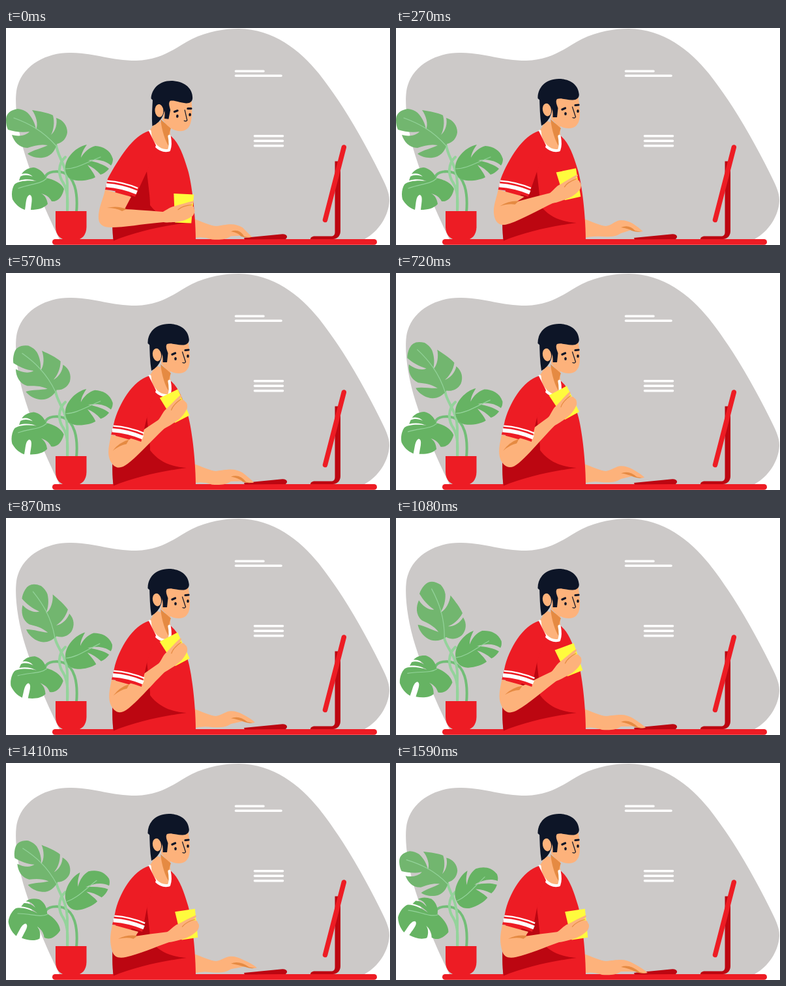
Write an HTML page that moves like this. It is 589 px wide and 333 px high and loops after 1.74 s.

```html
<!DOCTYPE html>
<html lang="en">
<head>
<meta charset="utf-8">
<title>Desk break</title>
<style>
html, body { margin: 0; width: 100%; height: 100%; overflow: hidden; background: #fff; }
svg { display: block; width: 100%; height: 100%; }
.red { fill: #ed1c24; }
.dark { fill: #bc0611; }
.skin { fill: #fdb27b; }
.shade { fill: #e58a42; }
.navy { fill: #0d1527; }
.leaf { fill: #66b363; }
.pale { fill: #72b66f; }
.line { fill: none; stroke-linecap: round; stroke-linejoin: round; }
.white { stroke: #fff; }
.stem { stroke: #94d39b; stroke-width: 4; }
.arch { stroke: #72be77; stroke-width: 4; }
.vein { stroke: #94d39b; stroke-width: 1.2; }
.ink { stroke: #0d1527; }
.band { fill: none; stroke: #fff; }
</style>
</head>
<body>
<svg viewBox="0 0 589 333">
  <path fill="#ccc9c8" d="M82 324C60 280 43 238 30 197C15 150 12 105 18 88C28 55 65 37 100 38C140 39 160 50 200 50C240 49 260 30 285 17C310 5 335 1 357 1C410 2 450 33 480 70C514 113 546 168 573 222C583 242 588 252 588 265C587 288 572 312 550 324Z"/>
  <path class="line white" stroke-width="3.6" d="M352.5 66.3H395M352.5 73.3H422M381.5 165.8H424.5M381.5 173.2H424.5M381.5 180.7H424.5"/>

  <path class="dark" d="M504.5 204.5H513V312C513 319 508 324 501 324H467C467 321 470 319.5 474 319.5H499C503 319.5 504.5 317 504.5 313Z"/>
  <path class="line" stroke="#ed1c24" stroke-width="7.5" d="M518.3 183L489.5 294.5"/>

  <path class="line arch" d="M60 229C63 219 80 219 88 222C104 228 111 250 108 283"/>
  <path class="line stem" id="stem"/>
  <path class="line stem" d="M91 198C80 208 79 225 88 238C95 250 95 265 94 283"/>
  <g id="leafC">
    <path class="leaf" d="M89 247C85 238 73 232 61 230C58 221 50 215 42 214C33 215 27 219 24 224C31 222 37 224 41 228C34 225 27 225 22 228L20 234C30 231 40 232 47 235C34 233 18 235 13 240C9 246 8 256 10 263C14 270 20 276 29 279C31 269 30 259 36 256C42 257 39 268 38 279C48 279 58 277 64 270C63 263 60 257 54 254C62 256 67 260 70 266C79 267 86 260 89 247Z"/>
    <path class="line vein" d="M62 231C53 240 37 239 19 246"/>
  </g>
  <g id="leafB">
    <path class="leaf" d="M91 213C92 198 108 182 124 179C120 185 116 191 115 199C120 190 128 183 137 181C149 182 160 187 164 201Q164 207 161 211C152 203 140 201 126 203C140 206 151 210 158 216Q152 223 145 225C139 218 132 213 125 210C130 217 135 223 137 229C130 233 118 235 108 234C97 233 90 225 91 213Z"/>
    <path class="line vein" d="M92 216C108 216 122 207 145 198"/>
  </g>
  <g id="leafA">
    <path class="pale" d="M3 156C1 152 0 147 0 141Q0 127 18 124Q27 125 33 130C40 137 45 147 46 156C50 148 46 134 40 126C52 128 64 130 72 134C75 145 73 157 69 164C76 158 79 147 77 138C88 141 94 150 94 160C93 169 87 176 78 178C75 190 67 198 56 199C47 200 38 197 33 193C42 187 54 185 64 180C52 178 43 181 33 184C20 184 12 174 9 164C20 167 31 165 36 159C24 161 13 159 3 156Z"/>
    <path class="line vein" d="M12 138C34 146 56 157 77 181"/>
  </g>
  <path class="red" d="M76 281H123.5V305C123.5 318 116 325 107 325H93C84 325 76 318 76 305Z"/>

  <rect class="red" x="71" y="324" width="498" height="8.8" rx="4.4"/>
  <path class="dark" d="M365 322L424 316.2C432 316 433 322 428 324L366 324.6Z"/>

  <path class="skin" id="typing"/>
  <path class="shade" id="knuckle"/>
  <path class="red" d="M222 158L195 185C180 215 164 245 163 285L164.5 326.5Q200 324.5 230 325H291C291 290 285 235 278 215C272 195 265 175 252 165Z"/>
  <path class="dark" d="M216 220C218 240 221 258 221 272C236 292 258 298 277 299C245 303 200 312 165 326.5C163 315 163 305 163.5 285L190 258Z"/>

  <path class="skin" d="M219 158C223 155 226 150 227 142L252 148C251 164 255 178 250 186C237 192 222 178 219 158Z"/>
  <path class="shade" d="M237 140C239 157 244 173 250 182C249 170 250 160 253 154Z"/>
  <path class="line white" stroke-width="4.3" d="M220.5 158.500C221 177 236 191 250 187.500C252.500 181 252 173 250.500 166"/>
  <g id="head">
    <path class="navy" d="M223 150C220.500 135 220.500 120 220 105H246L238 132Q234 144 223 150Z"/>
    <path class="skin" d="M242 104H279C282 118 283 132 281 141C279 150 273 154 265 154C255 154 246 149 238 139Z"/>
    <ellipse class="skin" cx="231.5" cy="125.5" rx="6.5" ry="10" transform="rotate(-10 231.5 125.5)"/>
    <path class="navy" d="M222 112L217.500 108C217 93 228 78 250 78C268 78 280 88 280.800 102C281 108 276 111 270 110.500C260 110 253 107 247 109C244 113 247 118 248.500 123L247 137H240.500C241 128 240 121 235 117C230 114 226 116 224 121Z"/>
    <path class="line ink" stroke-width="3.2" d="M255 125L259.500 123M275 118.500L280 118"/>
    <path class="line ink" stroke-width="1.2" d="M270.500 121L275.500 136.500Q274 139 271 137.500"/>
    <ellipse class="navy" cx="260" cy="131.500" rx="1.800" ry="2.500"/>
    <ellipse class="navy" cx="279" cy="127.500" rx="1.800" ry="2.500"/>
  </g>

  <path class="skin" id="arm"/>
  <path class="shade" id="crease"/>
  <path class="red" id="sleeve"/>
  <path class="band" id="thick" stroke-width="6"/>
  <path class="band" id="thin" stroke-width="2.3"/>
  <g id="cup">
    <path fill="#fffb3d" d="M-15.500 -22.500L15.500 -22L13 22H-12Z"/>
    <path class="skin" d="M-33 7C-25 3 -20 -2 -14 -3C-4 -6 6 -10 15 -12C18 -11 13 -7 5 -4C12 -6 17 -4 16.500 0C19 3 17 8 14.500 11C8 16 0 20 -10 21C-20 22 -28 23 -33 22Z"/>
    <path class="line" stroke="#e58a42" stroke-width="1.200" d="M13 -6C5 -5 -3 -3 -8 2"/>
  </g>
</svg>
<script>
const LOOP = 1740, STEP = 30, START = 60, END = 1590;

const $ = id => document.getElementById(id);
const set = (id, name, value) => $(id).setAttribute(name, value);
const draw = (id, d) => set(id, 'd', d);
const ramp = (t, from, to) => Math.min(1, Math.max(0, (t - from) / (to - from)));
const mix = (a, b, p) => a.map((v, i) => v + (b[i] - v) * p);

// Arm poses: cup x, y, turn, then elbow x, y.
const rest = [272, 277, 2, 157, 290];
const sip = [259, 200, -29, 175, 282];
const lowered = [278, 248, -9, 177, 283];

const along = (p, a, u, b, n) => [p[0] + a * u[0] + b * n[0], p[1] + a * u[1] + b * n[1]];
const unit = (p, q) => {
  const x = q[0] - p[0], y = q[1] - p[1], l = Math.hypot(x, y);
  return [x / l, y / l];
};

function drawArm(t) {
  const up = Math.sin(ramp(t, START, 720) * Math.PI / 2);
  const down = ramp(t, 720, 1260) ** 2.4;
  const [cx, cy, turn, ex, ey] = mix(mix(rest, sip, up), lowered, down);
  set('cup', 'transform', `translate(${cx} ${cy}) rotate(${turn})`);

  const a = turn * Math.PI / 180, c = Math.cos(a), s = Math.sin(a);
  const elbow = [ex, ey], wrist = [cx - 30 * c - 14 * s, cy - 30 * s + 14 * c];
  const u = unit(elbow, wrist), n = [-u[1], u[0]];
  const at = (x, y) => along(elbow, x, u, y, n);
  const end = (x, y) => along(wrist, x, u, y, n);
  const hem = [152 + 0.55 * (ex - rest[3]), 248], cuff = [hem[0] + 46, hem[1] + 11];

  draw('arm', `M${hem}C${[hem[0] - 3, hem[1] + 16]} ${at(-16, -14)} ${at(-15, 3)}` +
    `C${at(-14, 12)} ${at(-8, 16)} ${at(4, 16)}C${at(25, 16)} ${at(50, 11)} ${end(0, 8)}` +
    `L${end(5, 7)}L${end(5, -8)}L${end(-2, -8)}Q${at(45, -11)} ${at(25, -12)}L${[cuff[0] - 6, cuff[1]]}Z`);
  draw('crease', `M${at(28, -12)}Q${at(14, -18)} ${at(-2, -14)}Q${at(12, -14)} ${at(21, -9)}Z`);

  const w = unit(hem, cuff), v = [w[1], -w[0]];
  const bow = lift => `Q${along(hem, 24, w, lift, v)} `;
  const band = d => `M${along(hem, 0, w, d, v)}${bow(d + 4)}${along(cuff, 1, w, d, v)}`;
  draw('sleeve', `M219 158C195 165 173 200 ${along(hem, 0, w, 17, v)}L${hem}${bow(3)}${cuff}L217 218L230 180Z`);
  draw('thick', band(7));
  draw('thin', band(13.7));
}

function drawTyping(t) {
  const press = (1 + Math.cos(2 * Math.PI * t / 530)) / 2;
  const x = 377 + 9 * t / END, y = 312 + 10 * press, k = 295 + 7 * press;
  const palm = 319 + 5 * press;
  draw('typing', `M286 292C300 297 312 303 322 304C331 303 337 ${k} 345 ${k}C352 ${k} 358 ${k + 2} 363 ${k + 5}` +
    `Q${x - 6} ${y - 6} ${x} ${y}Q${x - 8} ${y + 2} ${x - 18} ${y - 2}L345 ${palm - 4}` +
    `C338 ${palm + 1} 328 ${palm + 2} 316 ${palm + 1}Q300 319 286 323Z`);
  draw('knuckle', `M345 ${k + 11}Q358 ${k + 6} ${x - 12} ${y - 1}Q${x - 4} ${y + 1} ${x} ${y}` +
    `Q${x - 10} ${y + 2} ${x - 17} ${y - 1}Q357 ${k + 13} 345 ${k + 11}Z`);
}

function drawPlant(t) {
  const rise = ramp(t, 270, 1080), fall = ramp(t, 1080, END), sway = ramp(t, 270, END) ** 2;
  const turn = 42 * rise - 45 * fall, lean = turn / 42;
  const x = 78 - 3 * lean + 2 * fall, y = 181 + 4 * lean + 5 * fall;
  set('leafA', 'transform', `translate(${x} ${y}) rotate(${turn}) scale(${1 - 0.06 * fall}) translate(-78 -181)`);
  draw('stem', `M${x - 1} ${y - 1}C${x + 2} 200 93 210 94 238V283`);
  set('leafB', 'transform', `translate(${4 * sway} ${-5 * sway}) rotate(${-22 * sway} 92 222)`);
  set('leafC', 'transform', `translate(${-2 * sway} 0) rotate(${28 * sway} 60 240)`);
}

function drawHead(t) {
  const tilt = (1 - ramp(t, START, 240)) ** 2;
  set('head', 'transform', `translate(0 ${1.5 * tilt}) rotate(${5 * tilt} 235 165)`);
}

function render(now) {
  const step = Math.floor((now % LOOP) / STEP) * STEP;
  const t = Math.min(END, Math.max(START, step));
  [drawPlant, drawTyping, drawHead, drawArm].forEach(part => part(t));
}

const begin = performance.now();
function tick() {
  render(performance.now() - begin);
  requestAnimationFrame(tick);
}
tick();
</script>
</body>
</html>
```
